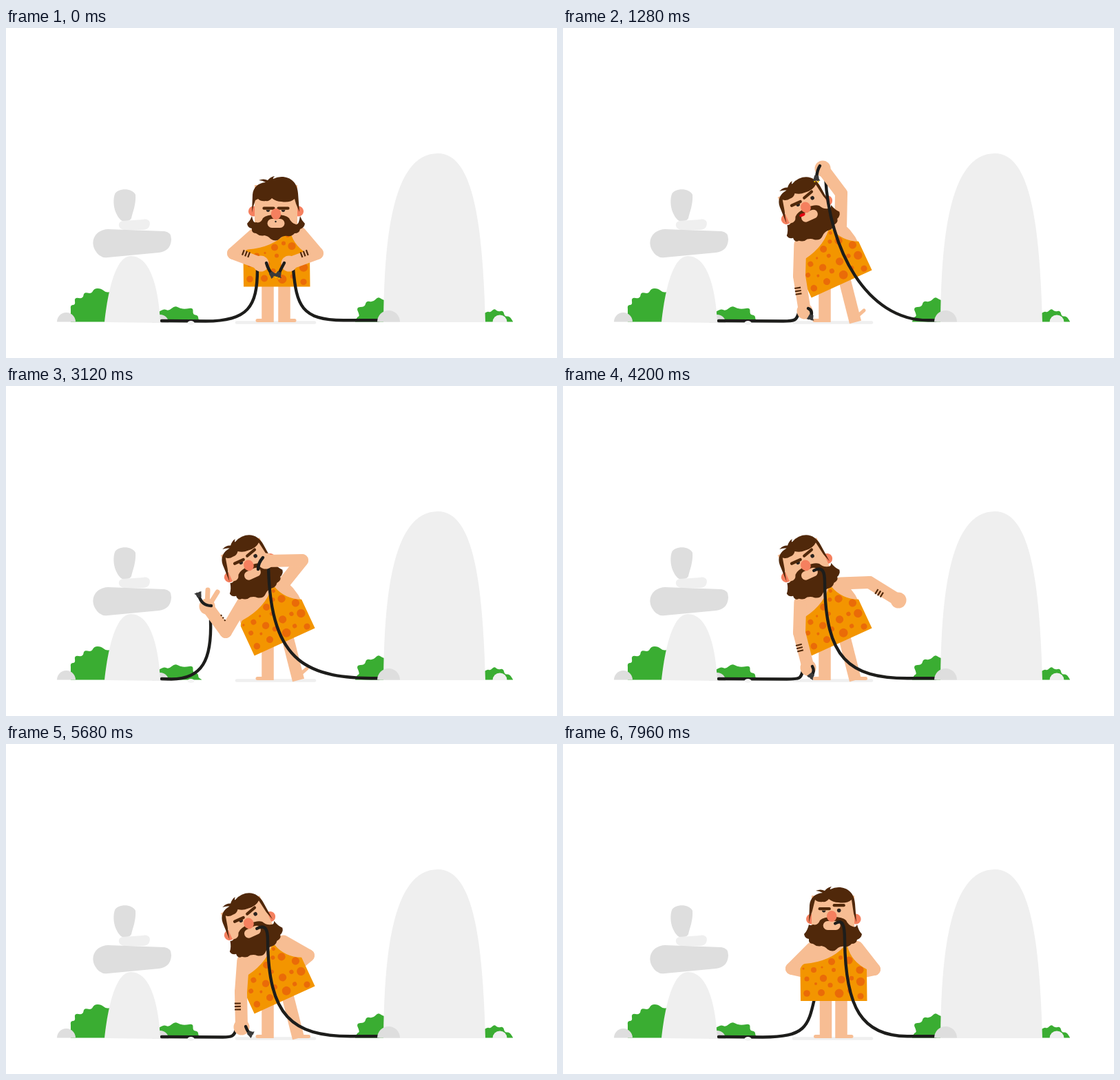
These frames come from a looping animation (800x479 px, 8000 ms). An HTML page with a canvas:

```html
<!DOCTYPE html>
<html lang="en">
<head>
<meta charset="utf-8">
<title>Caveman and cables</title>
<style>
html, body { margin: 0; width: 100%; height: 100%; overflow: hidden; background: #fff; }
canvas { display: block; width: 100%; height: 100%; }
</style>
</head>
<body>
<canvas id="stage" width="800" height="479"></canvas>
<script>
const c = document.getElementById('stage').getContext('2d');
const LOOP = 8000;
const SKIN = '#f7bd93', HAIR = '#50280a', RED = '#f5805f', LIGHT = '#efefef', GREY = '#dedede';
const GREEN = '#3aad32', TUNIC = '#f39500', SPOT = '#ea6b08', CABLE = '#1d1d1b', PLUG = '#3a3a3a';

// ---------- drawing helpers ----------
function fill(d, color) {
  c.fillStyle = color;
  c.fill(new Path2D(d));
}
function disc(x, y, rx, color, ry = rx) {
  c.fillStyle = color;
  c.beginPath();
  c.ellipse(x, y, rx, ry, 0, 0, 7);
  c.fill();
}
function dome(x, y, r, color) {
  c.fillStyle = color;
  c.beginPath();
  c.arc(x, y, r, Math.PI, 0);
  c.fill();
}
function line(pts, width, color, cap = 'round') {
  c.strokeStyle = color;
  c.lineWidth = width;
  c.lineCap = cap;
  c.lineJoin = 'round';
  c.beginPath();
  pts.forEach(p => c.lineTo(p[0], p[1]));
  c.stroke();
}
function curve(d, width = 4.4) {
  c.strokeStyle = CABLE;
  c.lineWidth = width;
  c.lineCap = 'round';
  c.lineJoin = 'round';
  c.stroke(new Path2D(d));
}
// Soft wavy leaf outline through the middles of the given points
function bush(pts, base) {
  const last = pts[pts.length - 1];
  let d = `M${pts[0][0]},${base}L${pts[0]}`;
  for (let i = 1; i < pts.length - 1; i++) {
    const [x0, y0] = pts[i], [x1, y1] = pts[i + 1];
    d += `Q${x0},${y0} ${(x0 + x1) / 2},${(y0 + y1) / 2}`;
  }
  fill(d + `L${last}L${last[0]},${base}Z`, GREEN);
}
function turned(x, y, angle, draw) {
  c.save();
  c.translate(x, y);
  c.rotate(angle);
  draw();
  c.restore();
}

// ---------- poses ----------
// body: tilt, drop, left leg x | head: x, y, pitch
// le, lh, re, rh: elbows and hands | lt, rt: cable tips relative to the hand
// lc, rc: ground x, control x, control, end
// face: left lid, right lid, brow lift, brow angle, shift | misc: toe, fingers, left band, right band
const LEAN = -0.426;
const ready = {
  body: [0, 2.5, 380], head: [392, 262, 1],
  le: [330, 327], lh: [370, 342], re: [452, 327], rh: [411, 342],
  lt: [8, -1, 11, 9, 16, 15], rt: [-7, -1, -12, 8, -15, 15],
  lc: [290, 351, 365, 405, 365, 350], rc: [490, 428, 422, 402, 417, 350],
  face: [0, 0, 0, 0, 0], misc: [0, 0, -6, 6]
};
const aim = {
  body: [1, 0, 380], head: [354, 264, 0],
  le: [343, 360], lh: [351, 411], re: [404, 240], rh: [377, 204],
  lt: [5, -4, 12, -1, 9, 8], rt: [-4, -4, -8, 2, -9, 13],
  lc: [320, 337, 339, 424, 342, 414], rc: [530, 440, 386, 320, 381, 215],
  face: [0.4, 1, 4.5, -0.27, 0], misc: [1, 0, 5, 11]
};
const bite = {
  ...aim, re: [430, 253], rh: [377, 254], rt: [-4, -5, -11, 3, -11, 12],
  rc: [540, 441, 384, 406, 381, 262]
};
const show = {
  ...bite, le: [319, 357], lh: [292, 320], lt: [6, -1, -8, -1, -12, -16],
  lc: [240, 285, 299, 397, 297, 340], face: [1, 1, 4.5, -0.27, 0], misc: [1, 1, 9, 11]
};
const letGo = {
  ...bite, le: [342, 358], lh: [354, 410], re: [445, 262], rh: [480, 215],
  lt: [6, -3, 10, 4, 6, 11], lc: [322, 342, 345, 424, 347, 414],
  rc: [510, 420, 381, 398, 380, 285], misc: [0.5, 0, 5, 6]
};
const out = {
  ...letGo, le: [343, 358], lh: [356, 409], re: [445, 285], rh: [487, 311],
  lt: [6, -2, 10, 5, 5, 11], lc: [325, 345, 345, 424, 348, 414],
  rc: [500, 415, 381, 395, 380, 285], misc: [0, 0, 5, 6]
};
const swing = { ...out, re: [449, 283], rh: [509, 298] };
const hide = { ...out, re: [439, 307], rh: [415, 327] };
const hold = {
  ...hide, le: [341, 360], lh: [342, 411], lt: [6, -1, 9, 7, 12, 9],
  lc: [315, 328, 331, 424, 334, 415]
};
const stand = {
  body: [0, 0, 381.5], head: [392, 254, 0],
  le: [332, 326], lh: [368, 334], re: [452, 327], rh: [418, 334],
  lt: hold.lt, rt: hold.rt,
  lc: [290, 352, 356, 410, 365, 370], rc: [500, 435, 412, 383, 411, 285],
  face: [0, 0, 0, 0, 0], misc: [0, 0, 11, 11]
};
const peek = {
  ...stand, rc: [500, 434, 410, 383, 409, 285], face: [0, 1, 5, 0, -1.8]
};
const KEYS = [
  [0, ready], [100, ready], [640, aim], [1450, aim], [1900, bite], [2580, bite],
  [2950, show], [3400, show], [3660, letGo], [3940, swing], [4180, out], [4380, out],
  [4850, hide], [5150, hide], [5550, hold], [5980, hold], [6540, stand], [7450, stand],
  [7750, peek], [LOOP, peek]
];
function poseAt(t) {
  let i = 1;
  while (t > KEYS[i][0]) i++;
  const [t0, a] = KEYS[i - 1], [t1, b] = KEYS[i];
  const u = (t - t0) / (t1 - t0), k = u * u * (3 - 2 * u), p = {};
  for (const name in a) p[name] = a[name].map((v, j) => v + (b[name][j] - v) * k);
  return p;
}

// ---------- scenery ----------
function backdrop() {
  c.fillStyle = '#fff';
  c.fillRect(0, 0, 800, 479);
  bush([[94, 408], [93, 402], [101, 402], [99, 391], [112, 393], [113, 383], [124, 386],
    [128, 378], [138, 378], [145, 384], [152, 383]], 426.5);
  bush([[222, 412], [229, 407], [236, 411], [245, 403], [253, 407], [260, 408], [272, 406],
    [271, 416], [279, 417], [279, 423], [284, 426]], 426.5);
  bush([[507, 426], [509, 420], [514, 418], [508, 405], [521, 405], [523, 396], [533, 398],
    [540, 390], [546, 394], [552, 396]], 426.5);
  bush([[692, 416], [699, 411], [703, 413], [709, 407], [714, 412], [722, 410], [724, 419],
    [731, 418], [736, 426]], 426.5);
  dome(87.5, 426.5, 13.5, GREY);
  dome(224, 428, 12, GREY);
  fill('M143,427C147,388 158,331 181,331C212,331 222,385 224,428Z', LIGHT);
  fill('M158,241C163,232 183,232 188,242C189,256 184,267 182,276Q180,280 175,280L169,280Q164,278 160,269C155,258 156,247 158,241Z', GREY);
  fill('M170,280L199,278C207,276 211,282 208,288Q206,293 198,293L172,293C162,292 161,281 170,280Z', LIGHT);
  fill('M148,292L230,295Q240,296 240,307Q239,324 222,326L148,333Q136,335 129,322C122,308 130,293 148,292Z', GREY);
  fill('M548,427C549,318 558,182 627,182C680,182 692,290 696,427Z', LIGHT);
  dome(717, 427, 10.5, LIGHT);
  line([[335, 427.5], [448, 427.5]], 4.4, LIGHT);
}

// ---------- figure ----------
const SPOTS = [
  [-3, -58, 5], [-29, -46, 4], [-39, -33, 3.5], [-15, -34, 5.2], [-26, -26, 2], [-5, -24, 3.6],
  [11, -32, 5.6], [0, -46, 3], [10, -64, 3], [22, -60, 5.6], [38, -46, 5.6], [39, -29, 6.2],
  [26, -34, 3.2], [8, -12, 6.4], [-18, -13, 5], [-39, -12, 4.8], [39, -8, 4.6], [-17, -50, 1.6],
  [-44, -48, 1.6], [23, -16, 3.2], [16, -75, 2.5]
];
const TUNIC_PATH = new Path2D('M-48.5,-48Q-46,-54 -42,-55Q-5,-58 15,-80L20,-80Q26,-58 48,-47L48.5,-1L-48,-1Z');

function legs(p) {
  const tilt = p.body[0], x = p.body[2];
  line([[x, 360], [x, 427]], 17.5, SKIN, 'butt');
  line([[x + 5, 424.5], [x - 15, 424.5]], 5, SKIN);
  const ax = 404 + 20.5 * tilt;
  line([[404 + 4 * tilt, 362], [ax, 427]], 17.5, SKIN, 'butt');
  turned(ax - 4, 424.5, -0.72 * p.misc[0], () => line([[0, 0], [19 + 3 * p.misc[0], 0]], 5, SKIN));
}
function bodyPlace(p) {
  return [393 + 11.8 * p.body[0], 374 - 1.5 * p.body[0] + p.body[1], LEAN * p.body[0]];
}
function shoulder(p, x, y) {
  const [bx, by, a] = bodyPlace(p);
  return [bx + x * Math.cos(a) - y * Math.sin(a), by + x * Math.sin(a) + y * Math.cos(a)];
}
function torso(p) {
  turned(...bodyPlace(p), () =>
    fill('M-32,-88Q-46,-72 -47,-48L47,-44Q47,-68 34,-88Z', SKIN));
}
function tunic(p) {
  turned(...bodyPlace(p), () => {
    c.clip(TUNIC_PATH);
    c.fillStyle = TUNIC;
    c.fillRect(-60, -90, 120, 100);
    SPOTS.forEach(([x, y, r]) => disc(x, y, r, SPOT));
  });
}
function upperArm(from, elbow) {
  line([from, elbow], 18, SKIN);
}
function foreArm(elbow, hand, band) {
  line([elbow, hand], 18, SKIN);
  disc(hand[0], hand[1], 11.5, SKIN);
  const half = Math.min(4.5, 10 - Math.abs(band));
  if (half <= 0) return;
  const dx = hand[0] - elbow[0], dy = hand[1] - elbow[1], len = Math.hypot(dx, dy);
  turned(elbow[0], elbow[1], Math.atan2(dy, dx), () => {
    for (let i = -1; i < 2; i++) {
      const x = len * 0.41 + i * 4.4;
      line([[x, band - half], [x, band + half]], 2.2, HAIR, 'butt');
    }
  });
}
function tip(hand, [bx, by, cx, cy, px, py], plug, jaws) {
  c.save();
  c.translate(hand[0], hand[1]);
  curve(`M${bx},${by}Q${cx},${cy} ${px},${py}`);
  if (plug) turned(px, py, Math.atan2(py - cy, px - cx), () => {
    if (jaws) {
      line([[4, -3], [7, -3]], 2, '#f5c400', 'butt');
      line([[4, 2], [7, 2]], 2, '#f5c400', 'butt');
    }
    fill('M-3,-2.8L2,-4L4,-6L5,-1L4,0L5,1L5,5L2,4L-3,3Z', PLUG);
  });
  c.restore();
}

function eye(x, browX, open, lift, angle) {
  disc(x, -12.4, 2.8, '#2b2420');
  c.fillStyle = SKIN;
  c.fillRect(x - 6, -19, 12, 6.6 - 4 * open);
  turned(browX, -14.8 - lift, angle, () => line([[-7, 0], [7, 0]], 4.2, HAIR));
}
function head(p, t) {
  const [hx, hy, pitch] = p.head, [lidL, lidR, lift, angle, shift] = p.face;
  const f = 12 * pitch, q = 14 * pitch, talking = t > 420 && t < 1850;
  turned(hx, hy, LEAN * p.body[0], () => {
    disc(-32.5 - shift * 0.6, 4 * pitch, 7.6, RED);
    disc(32.5 - shift * 0.3, 4 * pitch, 7.6, RED);
    fill(`M-31,-34L31,-34L31,${14 + f}L-31,${14 + f}Z`, SKIN);
    // beard with moustache
    const top = 8 + f / 4;
    fill(`M-35,${top}Q-37,17 -42,22Q-41,28 -35,29Q-36,36 -29,36Q-23,41 -17,39Q-11,40 -8,44
      Q0,49 5,44Q10,39 17,40Q23,41 27,36Q34,36 35,30Q41,28 42,22Q37,17 35,${top}
      Q33,${13 + f} 29,${11 + f}Q22,${9 + f} 19,${2 + f}Q14,${-3 + f} 0,${-3 + f}
      Q-14,${-3 + f} -19,${2 + f}Q-22,${10 + f} -29,${8 + f}Q-33,${10 + f} -35,${top}Z`, HAIR);
    c.save();
    c.translate(shift, f);
    c.fillStyle = SKIN;
    c.beginPath();
    c.roundRect(-12.5, 3, 25, 13, 6.5);
    c.fill();
    if (talking) disc(-9, 4, 4.4, '#e30613', 2.2);
    if (t < 420) disc(-0.5, 7, 1.2, CABLE);
    c.translate(0, q - f + pitch / 2);
    eye(-11.5 + 3 * p.body[0], -10.5, lidL, 0, 0);
    eye(10.5 + 4 * p.body[0], 10.5, lidR, lift, angle);
    c.translate(0, f - q - pitch / 2);
    disc(0, -4, 7.2, RED, 8);
    c.restore();
    fill(`M-35,6L-34,-20C-33,-31 -26,-37 -15,-38Q-20,-41 -25,-41Q-18,-44 -12,-41Q-8,-46 -2,-47
      Q-5,-44 -4,-43Q2,-46 8,-46C22,-46 31,-37 32,-22L34,5L${30 - pitch},${-8 + pitch}L27,${-28 + q}
      Q20,${-22 + q} 8,${-24 + q}Q0,${-24 + q} -6,${-29 + q}Q-10,${-24 + q} -15,${-25 + q}
      Q-22,${-24 + q} -26,${-28 + q}L-30,-12Q-33,-4 -35,6Z`, HAIR);
  });
}

// ---------- cables ----------
function leftCable([gx, cx, dx, dy, ex, ey]) {
  curve(`M226,425L${gx},425.5C${cx},425.5 ${dx},${dy} ${ex},${ey}`);
}
function rightCable(p, bitten) {
  const [gx, cx, dx, dy, ex, ey] = p.rc;
  let d = `M541,424.3L${gx},424.3C${cx},424 ${dx},${dy} ${ex},${ey}`;
  if (bitten) {
    const a = LEAN * p.body[0];
    const sx = p.head[0] + 5 * Math.cos(a) - 6.5 * Math.sin(a) + 3 * p.body[0] + p.face[4];
    const sy = p.head[1] + 5 * Math.sin(a) + 6.5 * Math.cos(a);
    d += `C${ex},${sy + 2} ${ex - 3},${sy - 7} ${sx},${sy}`;
  }
  curve(d);
}

function draw(t) {
  const p = poseAt(t);
  const leftBack = t > 6260, rightBack = t > 4640, bitten = t > 3440;
  const ls = shoulder(p, -31, -78), rs = shoulder(p, 34, -79);
  const leftArm = () => {
    upperArm(ls, p.le);
    foreArm(p.le, p.lh, p.misc[2]);
  };
  backdrop();
  if (leftBack) leftCable(p.lc);
  legs(p);
  if (leftBack) leftArm();
  if (rightBack) {
    upperArm(rs, p.re);
    foreArm(p.re, p.rh, 11);
  }
  torso(p);
  tunic(p);
  if (!rightBack) upperArm(rs, p.re);
  if (!leftBack) {
    leftCable(p.lc);
    leftArm();
    const [x, y] = p.lh, k = p.misc[1];
    if (k > 0.05) {
      line([[x, y], [x + k, y - 24 * k]], 7, SKIN);
      line([[x + 2, y], [x + 15 * k, y - 21 * k]], 7, SKIN);
    }
    tip(p.lh, p.lt, true, false);
  }
  head(p, t);
  rightCable(p, bitten);
  if (!rightBack) foreArm(p.re, p.rh, p.misc[3]);
  if (!bitten) tip(p.rh, p.rt, t < 1860, true);
  dome(555.5, 426.5, 16.5, GREY);
  disc(268.5, 428, 5, '#f4f4f4', 3);
}

function tick(now) {
  draw(now % LOOP);
  requestAnimationFrame(tick);
}
draw(0);
requestAnimationFrame(tick);
</script>
</body>
</html>
```
